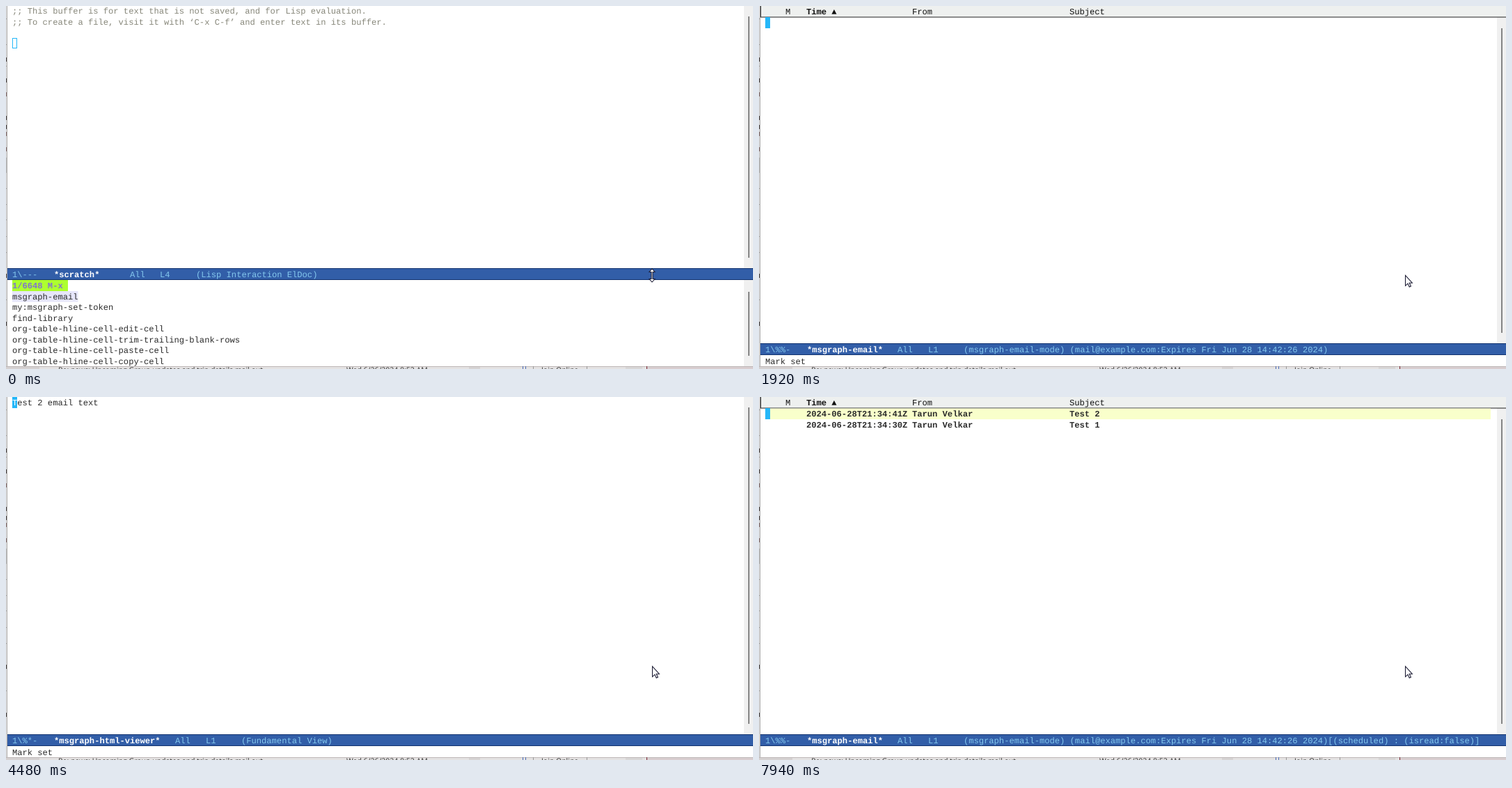
Write an HTML page that moves like this. It is 1073x522 px and loops after 8 s.

```html
<!DOCTYPE html>
<html lang="en">
<head>
<meta charset="utf-8">
<title>Mail in the editor</title>
<style>
html, body { margin: 0; width: 100%; height: 100%; overflow: hidden; background: #fff; }
svg { display: block; width: 1073px; height: 522px; }
text {
  font: 12.12px "Liberation Mono", monospace;
  white-space: pre;
  text-rendering: geometricPrecision;
  fill: #2b2b2b;
}
.bold { font-weight: 700; }
.note { fill: #87877a; }
.mode { fill: #84c8ee; }
.name { fill: #fff; font-weight: 700; }
.prompt { fill: #7f72cf; font-weight: 700; }
.head { fill: #111; }
.behind { font: 10.5px "Open Sans", sans-serif; fill: #333; }
</style>
</head>
<body>
<svg id="stage" viewBox="0 0 1073 522"></svg>
<script>
const NS = 'http://www.w3.org/2000/svg';
const LOOP = 8000, LEFT = 9, CELL = 7.27, BLUE = '#25b7f8';
const stage = document.getElementById('stage');

function add(parent, tag, attrs, content) {
  const el = document.createElementNS(NS, tag);
  for (const key in attrs) el.setAttribute(key, attrs[key]);
  if (content !== undefined) el.textContent = content;
  return parent.appendChild(el);
}
const group = (parent = stage) => add(parent, 'g', {});
const box = (g, x, y, width, height, fill) => add(g, 'rect', { x, y, width, height, fill });
const write = (g, x, mid, str, cls = '') => add(g, 'text', { x, y: mid + 4, class: cls }, str);
const show = (el, on) => el.style.display = on ? '' : 'none';

// The desktop peeking out on the left and below
function drawDesktop() {
  const g = group();
  box(g, 0, 0, 1073, 522, '#e4e2e2');
  box(g, 0, 218, 1, 22, '#bdbdbd');
  for (const y of [18, 55, 86, 262, 285, 307, 331, 354, 422]) box(g, 0, y, 1, 1, '#a5a5a5');
  for (const y of [74, 104, 158, 171, 385, 454]) box(g, 0, y, 1, 6, '#4a4444');
  for (const y of [124, 181, 203]) box(g, 0, y, 1, 6, '#8a6f70');
  box(g, 1, 0, 1, 518, '#a9a9a9');
  box(g, 0, 518, 48, 4, '#d5d1d1');
  box(g, 665, 518, 16, 4, '#d6d3d3');
  box(g, 890, 518, 24, 4, '#d8d6d6');
  box(g, 920, 518, 153, 4, '#d8cdcf');
  box(g, 0, 518, 1073, 1, '#bdb6b6');
  for (const x of [742, 746]) box(g, x, 518, 1, 4, '#4d6fb8');
  for (const x of [757, 834]) box(g, x, 518, 1, 4, '#999');
  box(g, 920, 518, 1, 4, '#7b2635');
  write(g, 75, 522.5, 'Re: news: Upcoming Group updates and trip details mail out', 'behind');
  write(g, 489, 522.5, 'Wed 6/26/2024 8:53 AM', 'behind');
  write(g, 769, 522.5, 'Join Online', 'behind');
  box(g, 2, 0, 1071, 518, '#fff');
}

function modeLine(g, top, flags, name, rest) {
  box(g, 2, top, 1071, 17, '#325ea8');
  box(g, 2, top, 1071, 1, '#12336f');
  box(g, 2, top + 16, 1071, 1, '#12336f');
  write(g, LEFT, top + 9, flags, 'mode');
  write(g, 69, top + 9, name, 'name');
  for (const [x, str] of rest) write(g, x, top + 9, str, 'mode');
}

function scrollBar(g, top, bottom, from, to) {
  box(g, 1060, top, 13, bottom - top, '#f0f0f0');
  box(g, 1066, from, 2, to - from, '#858585');
}

function scratch(g, top) {
  scrollBar(g, 0, top, 15, top === 377 ? 362 : 470);
  write(g, LEFT, 7, ';; This buffer is for text that is not saved, and for Lisp evaluation.', 'note');
  write(g, LEFT, 22.5, ';; To create a file, visit it with ‘C-x C-f’ and enter text in its buffer.', 'note');
  modeLine(g, top, '1\\---', '*scratch*', [[178, 'All'], [221, 'L4'], [273, '(Lisp Interaction ElDoc)']]);
}

function hollowCursor(g) {
  add(g, 'rect', { x: 9.5, y: 46.5, width: 6, height: 14, fill: 'none', stroke: BLUE });
}

function prompt(g, mid, str) {
  box(g, LEFT, mid - 8, str.length * CELL, 16, '#adff2f');
  write(g, LEFT, mid, str, 'prompt');
}

function mailBuffer(g, full) {
  scrollBar(g, 16, 485, 32, 470);
  box(g, 2, 0, 1071, 16, '#eef0ef');
  box(g, 2, 0, 1, 16, '#222');
  box(g, 2, 15.5, 1071, 1, '#222');
  write(g, 38, 7.5, 'M', 'head');
  write(g, 68, 7.5, 'Time ▲', 'head bold');
  write(g, 220, 7.5, 'From', 'head');
  write(g, 446, 7.5, 'Subject', 'head');
  let status = '(msgraph-email-mode) (mail@example.com:Expires Fri Jun 28 14:42:26 2024)';
  if (full) {
    status += '[(scheduled) : (isread:false)]';
    box(g, LEFT, 16.5, 1042, 15.5, '#f9ffcb');
    [['41Z', 'Test 2'], ['30Z', 'Test 1']].forEach(([sec, subject], i) => {
      const mid = 24 + i * 15.6;
      write(g, 68, mid, '2024-06-28T21:34:' + sec, 'bold');
      write(g, 220, mid, 'Tarun Velkar', 'bold');
      write(g, 446, mid, subject, 'bold');
    });
  }
  modeLine(g, 485, '1\\%%-', '*msgraph-email*', [[199, 'All'], [243, 'L1'], [294, status]]);
}

function viewer(g, str) {
  scrollBar(g, 0, 485, 15, 470);
  write(g, LEFT, 7.5, str);
  modeLine(g, 485, '1\\%*-', '*msgraph-html-viewer*', [[243, 'All'], [287, 'L1'], [338, '(Fundamental View)']]);
}

const markSet = g => write(g, LEFT, 510.5, 'Mark set');

const commands = ['msgraph-email', 'my:msgraph-set-token', 'find-library',
  'org-table-hline-cell-edit-cell', 'org-table-hline-cell-trim-trailing-blank-rows',
  'org-table-hline-cell-paste-cell', 'org-table-hline-cell-copy-cell'];

// Each scene: how to draw it, and the corner of its blinking cursor
const scenes = {
  command: [g => {
    scratch(g, 377);
    hollowCursor(g);
    scrollBar(g, 394, 518, 411, 503);
    prompt(g, 402, '1/6648 M-x ');
    box(g, LEFT, 410, 13 * CELL, 15.5, '#e6e6fa');
    commands.forEach((name, i) => write(g, LEFT, 417.6 + i * 15.55, name));
  }, 89, 394],
  ask: [g => {
    scratch(g, 485);
    hollowCursor(g);
    prompt(g, 510.5, 'Buffer name: ');
    write(g, 103.5, 510.5, '*msgraph-email*');
  }, 213, 503],
  scratch: [g => scratch(g, 485), 9, 46],
  blank: [g => { mailBuffer(g, false); markSet(g); }, 9, 16],
  list: [g => { mailBuffer(g, true); markSet(g); }, 9, 16],
  quiet: [g => mailBuffer(g, true), 9, 16],
  opening: [g => viewer(g, ''), 9, 0],
  view: [g => { viewer(g, 'Test 2 email text'); markSet(g); }, 9, 0]
};

// [start in ms, scene, cursor lit]
const steps = [
  [0, 'command', 0], [90, 'command', 1],
  [400, 'ask', 1], [930, 'ask', 0], [1460, 'ask', 1],
  [1800, 'scratch', 1], [1920, 'blank', 1],
  [1990, 'list', 1], [2450, 'list', 0], [2980, 'list', 1], [3450, 'list', 0], [3920, 'list', 1],
  [4320, 'quiet', 1], [4400, 'opening', 1],
  [4480, 'view', 1], [4940, 'view', 0], [5470, 'view', 1], [5940, 'view', 0], [6470, 'view', 1],
  [6940, 'quiet', 1], [7470, 'quiet', 0], [7940, 'quiet', 1]
];

drawDesktop();
const layers = {};
for (const name in scenes) {
  const [draw, x, y] = scenes[name];
  const root = group();
  draw(root);
  const cursor = group(root);
  box(cursor, x, y, 7, y > 400 ? 15 : 16, BLUE);
  if (name === 'view') write(cursor, LEFT, 7.5, 'T').style.fill = '#fff';
  layers[name] = { root, cursor };
}

const pen = { fill: '#fff', stroke: '#1d1d35', 'stroke-width': 1.1, 'stroke-linejoin': 'miter' };
const resizer = add(stage, 'path', {
  ...pen, d: 'M928 378l4 4.5h-3v10h3l-4 4.5-4-4.5h3v-10h-3z'
});
const arrow = add(stage, 'path', {
  ...pen, d: 'M928.5 387.5v14.8l3.4-3.2 2.3 5 2.2-1-2.2-4.9h4.1z'
});

function frame(now) {
  const t = now % LOOP;
  const [, scene, lit] = steps.findLast(step => step[0] <= t) || steps[0];
  for (const name in layers) show(layers[name].root, name === scene);
  show(layers[scene].cursor, lit);
  show(resizer, scene === 'command');
  show(arrow, scene !== 'command');
}
const start = performance.now();
function tick() {
  frame(performance.now() - start);
  requestAnimationFrame(tick);
}
tick();
</script>
</body>
</html>
```
